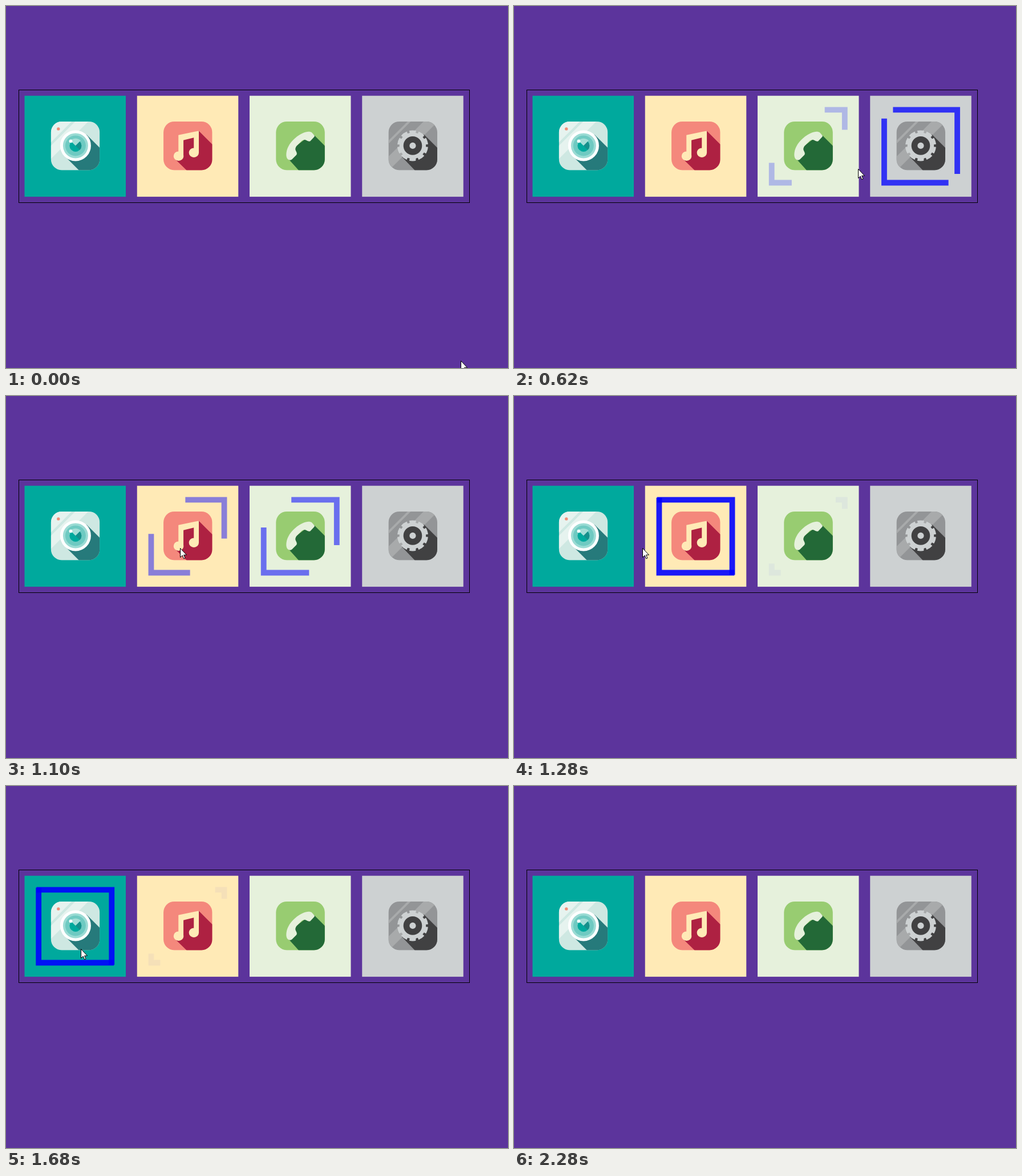
Write an HTML page that moves like this. It is 880 px wide and 636 px high and loops after 2770 ms.

```html
<!DOCTYPE html>
<html lang="en">
<head>
<meta charset="utf-8">
<title>Hover brackets</title>
<style>
  html, body { margin: 0; width: 100%; height: 100%; overflow: hidden; background: #5c349c; }
  svg { display: block; width: 880px; height: 636px; }
  .bracket { fill: #00f; }
</style>
</head>
<body>
<svg viewBox="0 0 880 636">
  <defs>
    <clipPath id="icon"><rect x="46.3" y="45.2" width="85.5" height="85.5" rx="19"/></clipPath>
  </defs>
  <rect x="22.5" y="147.5" width="790" height="198" fill="none" stroke="#000"/>

  <!-- camera -->
  <g class="card">
    <rect width="177.5" height="177.4" fill="#00a99d"/>
    <g clip-path="url(#icon)">
      <path fill="#cee8e2" d="M46 45h86v86h-86z"/>
      <path fill="#e6f3ef" d="M46 45H83L46 82zM89 45H112L46 111V88z"/>
      <path fill="#267a7b" d="M108.5 68L132 91.5V131H95.500L70.5 106z"/>
    </g>
    <circle cx="59.3" cy="58.2" r="2.7" fill="#ef8f78"/>
    <g transform="translate(89.4 87.7)">
      <circle r="24.5" fill="#9bdbd4" stroke="#fff" stroke-width="5"/>
      <circle r="18" fill="#6fcac2"/>
      <circle r="10.5" fill="#00a99d"/>
      <path fill="#a5ded7" d="M0 0L-9 -9A12.7 12.7 0 0 1 9 -9z"/>
      <path fill="#267a7b" opacity=".55" d="M0 0L7.4 -7.4A10.5 10.5 0 0 1 7.4 7.4z"/>
      <circle cx="-8.4" cy="-8" r="2.9" fill="#fff"/>
    </g>
  </g>

  <!-- music -->
  <g class="card">
    <rect width="177.5" height="177.4" fill="#ffeab6"/>
    <g clip-path="url(#icon)">
      <path fill="#f4887c" d="M46 45h86v86h-86z"/>
      <path fill="#ae2142" d="M108 61.5L132 85.5V131H87L67 111.5L80 100V70z"/>
    </g>
    <g fill="#ffeab6">
      <path d="M72.5 69L108.3 61.5V100H99.5V73.5L81.3 78V106H72.5z"/>
      <ellipse cx="72.8" cy="106" rx="8.8" ry="8.3"/>
      <ellipse cx="99.6" cy="100" rx="8.7" ry="8.3"/>
    </g>
  </g>

  <!-- phone -->
  <g class="card">
    <rect width="177.5" height="177.4" fill="#e6f1dc"/>
    <g clip-path="url(#icon)">
      <path fill="#98cc71" d="M46 45h86v86h-86z"/>
      <path fill="#236937" d="M112 68L132 88V131H86L69 112L82 88L100 74z"/>
    </g>
    <path fill="#e6f1dc" d="M66.5 111C62 106 64 90 76 78C88 65.5 103 60 109 64.5L113.500 69.5Q114.5 71 113 72.5L106.5 79.5Q104.5 81 101 79Q96.5 75.500 91.5 79L82.500 88Q78.5 92.5 81.500 97.5Q84 101.5 82 104L74.5 111.5Q70.5 115 66.5 111z"/>
  </g>

  <!-- settings -->
  <g class="card">
    <rect width="177.5" height="177.4" fill="#cdd1d2"/>
    <g clip-path="url(#icon)">
      <path fill="#939597" d="M46 45h86v86h-86z"/>
      <path fill="#a8aaab" d="M80 45H85.5L46 84.5V79zM108 45H133L46 132V107z"/>
      <path fill="#414142" d="M108.5 68L132 91.5V131H92.5L69.5 107z"/>
    </g>
    <g fill="#cdd1d2" transform="translate(88.7 87.7)">
      <circle r="23.2"/>
      <circle r="24.500" fill="none" stroke="#cdd1d2" stroke-width="5"
        pathLength="20" stroke-dasharray="1.45 .55" transform="rotate(-103)"/>
      <circle r="16.3" fill="#414142"/>
      <circle r="5.6"/>
    </g>
  </g>

  <path id="cursor" fill="#fff" stroke="#000"
    d="M0 0V16L3.7 12.6L6.2 18.3L8.5 17.3L6.1 11.7H11z"/>
</svg>

<script>
  const LOOP = 2770, FADE = 300, GONE = 2280;
  const LEFT = 32.5, TOP = 157.7, PITCH = 197.25;
  const FULL = 137.9, REST = 19.7, LINE = 9.8, EDGE = 157.7;

  // Pointer turns: time, x, y
  const turns = [
    [70, 797, 623], [200, 770, 345], [320, 745, 279], [800, 518, 290], [1100, 305, 267],
    [1500, 129, 267], [1680, 130, 285], [1920, 413, 469], [2220, 865, 621]
  ];

  // The pointer reaches the cards from right to left, then leaves the row.
  const crossings = [209, 578, 1020, 1420, 1779];

  const clamp = v => Math.max(0, Math.min(1, v));

  // cubic-bezier(.25, .1, .25, 1)
  function ease(x) {
    if (x <= 0 || x >= 1) return clamp(x);
    let lo = 0, hi = 1, s;
    for (let i = 0; i < 20; i++) {
      s = (lo + hi) / 2;
      if (0.75 * s - 0.75 * s * s + s * s * s < x) lo = s; else hi = s;
    }
    return 0.3 * s + 2.4 * s * s - 1.7 * s * s * s;
  }

  function pointerAt(t) {
    const next = Math.max(1, turns.findIndex(turn => turn[0] > t));
    const [a, b] = t < GONE - 60 ? turns.slice(next - 1, next + 1) : turns.slice(-2);
    const k = clamp((t - a[0]) / (b[0] - a[0]));
    return [1, 2].map(i => Math.round(a[i] + (b[i] - a[i]) * k) + 0.5);
  }

  function addBracket(card, turn) {
    const path = document.createElementNS('http://www.w3.org/2000/svg', 'path');
    const mid = EDGE - FULL / 2;
    path.setAttribute('class', 'bracket');
    path.setAttribute('transform', `rotate(${turn} ${mid} ${mid})`);
    card.append(path);
    return path;
  }

  const cursor = document.getElementById('cursor');
  const cards = [...document.querySelectorAll('.card')];
  const brackets = cards.map((card, i) => {
    card.setAttribute('transform', `translate(${LEFT + PITCH * i} ${TOP})`);
    return [0, 180].map(turn => addBracket(card, turn));
  }).reverse();

  function draw(t) {
    cursor.setAttribute('transform', `translate(${pointerAt(t)})`);
    cursor.setAttribute('visibility', t < GONE ? 'visible' : 'hidden');

    brackets.forEach((pair, i) => {
      const p = ease((t - crossings[i]) / FADE) - ease((t - crossings[i + 1]) / FADE);
      const size = REST + (FULL - REST) * p;
      const inner = size - LINE;
      for (const path of pair) {
        path.setAttribute('d',
          `M${EDGE - size} ${EDGE - FULL}h${size}v${size}h${-LINE}v${-inner}h${-inner}z`);
        path.setAttribute('opacity', Math.min(4 * p, 0.1 + 0.8 * p));
      }
    });
  }

  const start = performance.now();
  function tick() {
    draw((performance.now() - start) % LOOP);
    requestAnimationFrame(tick);
  }
  tick();
</script>
</body>
</html>
```
